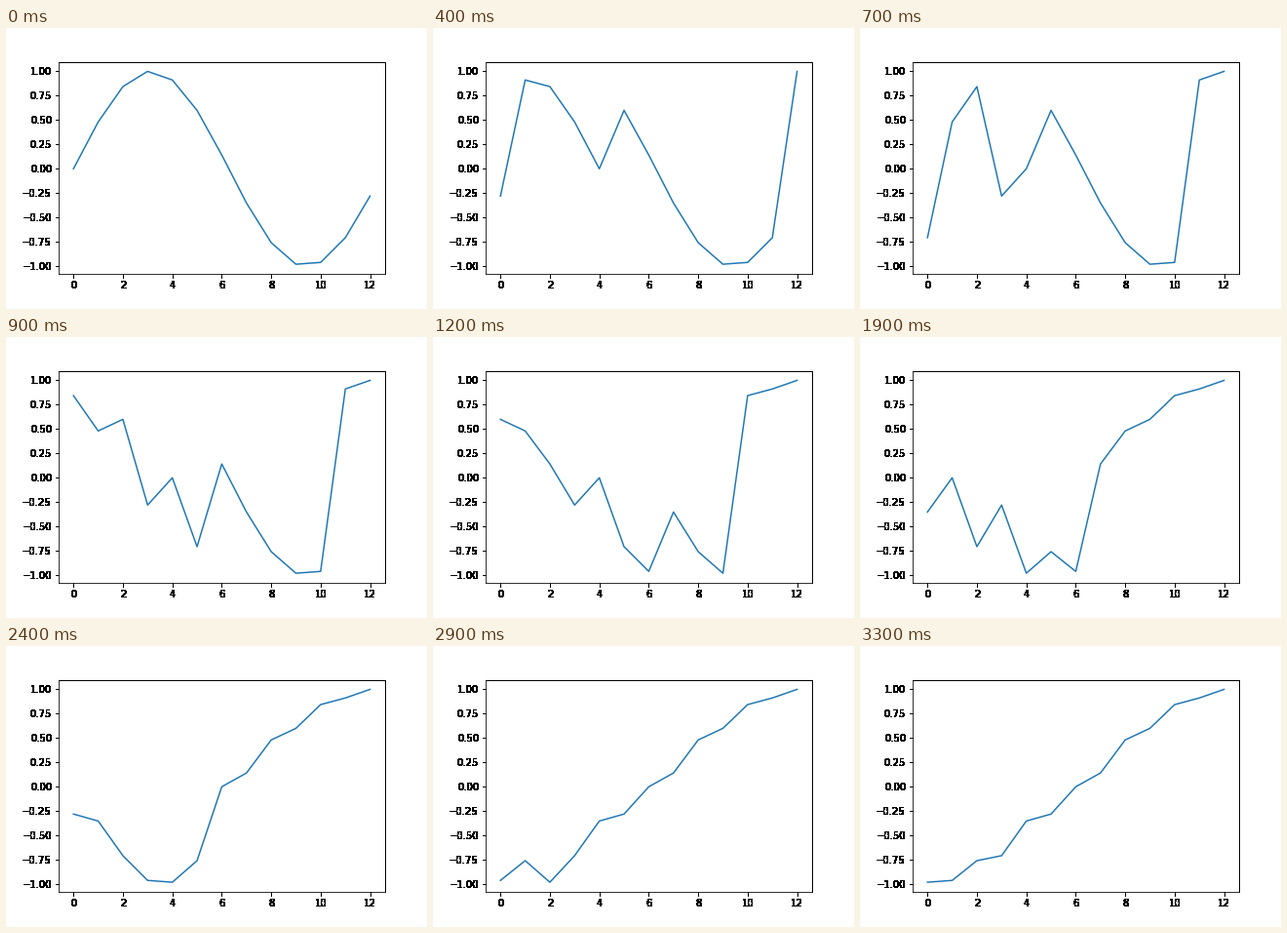
A matplotlib script for the animation above (3.4 s loop, 432 px wide and 288 px high).

```python
import matplotlib.pyplot as plt
import numpy as np
from matplotlib.animation import FuncAnimation


def heap_sort(values):
    """Yield the list before sorting and after every swap of a heap sort."""
    a = list(values)
    yield a[:]

    def swap(i, j):
        a[i], a[j] = a[j], a[i]
        return a[:]

    def sift_down(i, size):
        while True:
            kids = [k for k in (2 * i + 1, 2 * i + 2) if k < size]
            top = max([i] + kids, key=lambda k: a[k])
            if top == i:
                return
            yield swap(i, top)
            i = top

    n = len(a)
    for i in range(n // 2 - 1, -1, -1):
        yield from sift_down(i, n)
    for end in range(n - 1, 0, -1):
        yield swap(0, end)
        yield from sift_down(0, end)


def harden(image, dpi):
    """Make every partly covered pixel opaque, for heavy unsmoothed edges."""
    solid = image.copy()
    solid[..., 3] = image[..., 3] > 0
    return solid, 0, 0


plt.rcParams.update({"font.family": "DejaVu Sans", "font.size": 10})

x = np.arange(13)
states = list(heap_sort(np.sin(x / 2)))

fig = plt.figure(figsize=(6, 4), dpi=72, facecolor="white")
fig.subplots_adjust(left=0.125, right=0.9, bottom=0.125, top=0.88)
ax = fig.add_subplot()
line, = ax.plot(x, states[0], color="#1f77b4", lw=1.5)
xlim, ylim = ax.get_xlim(), ax.get_ylim()
ax.set_xticks(np.arange(0, 13, 2))
ax.set_yticks(np.linspace(-1, 1, 9))
ax.set(xlim=xlim, ylim=ylim)

for axis in (ax.xaxis, ax.yaxis):
    for tick in axis.get_major_ticks():
        tick.label1.set_agg_filter(harden)
        tick.tick1line.set_agg_filter(harden)
for side in ("top", "right"):
    ax.spines[side].set_agg_filter(harden)


def update(i):
    line.set_ydata(states[i])
    return line,


anim = FuncAnimation(fig, update, frames=len(states), interval=100,
                     repeat=True, repeat_delay=0, blit=False)
plt.show()
```
